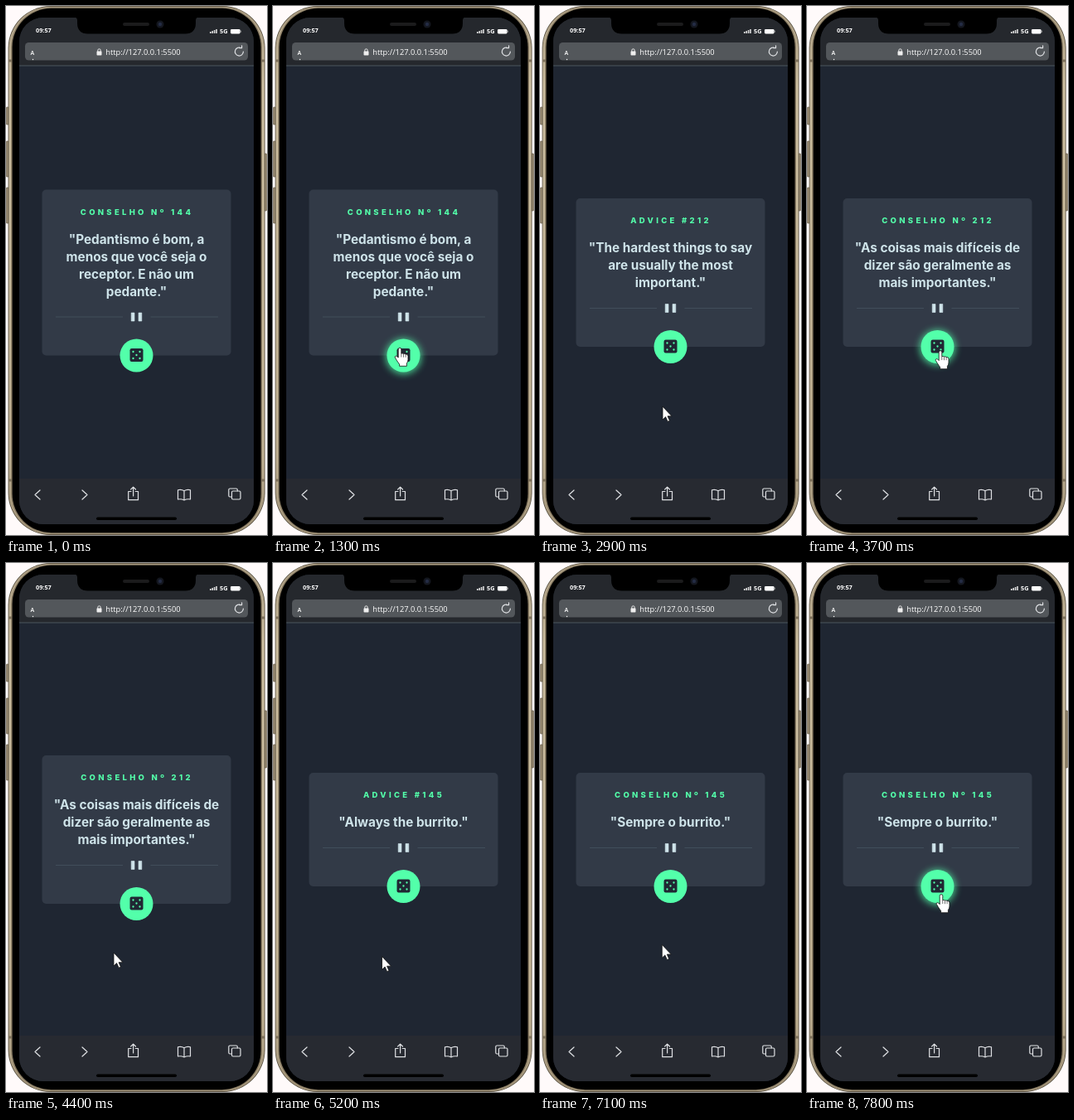
An HTML page that plays this animation: 315 px wide and 638 px high, repeating every 8 s.

```html
<!DOCTYPE html>
<html lang="pt">
<head>
<meta charset="utf-8">
<title>Advice</title>
<style>
html, body { margin: 0; width: 100%; height: 100%; overflow: hidden; background: #fffafa; }
svg { display: block; width: 315px; height: 638px; }
text { font-family: "Open Sans", "Noto Sans", sans-serif; fill: #fff; }
#label, #quote text { font-family: Inter, sans-serif; text-anchor: middle; }
#label { font-size: 9.5px; font-weight: 800; letter-spacing: 3.3px; fill: #53ffaa; }
#quote text { font-size: 15.3px; font-weight: 700; fill: #cee3e9; }
.icon { fill: none; stroke: #dfe1e4; stroke-width: 1.2; stroke-linecap: round; stroke-linejoin: round; }
</style>
</head>
<body>
<svg viewBox="0 0 315 638">
  <defs>
    <linearGradient id="gold" x2="0" y2="1">
      <stop offset="0" stop-color="#a89a80"/>
      <stop offset=".15" stop-color="#cbbd9f"/>
      <stop offset=".85" stop-color="#bfb092"/>
      <stop offset="1" stop-color="#a09278"/>
    </linearGradient>
    <filter id="blur" x="-50%" y="-50%" width="200%" height="200%"><feGaussianBlur stdDeviation="4"/></filter>
    <clipPath id="screen"><rect x="16" y="14" width="283" height="611" rx="29"/></clipPath>
  </defs>

  <!-- phone body -->
  <g fill="#9c8e74" stroke="#5d5443" stroke-width=".6">
    <rect x=".3" y="122" width="5" height="21" rx="1"/>
    <rect x=".3" y="163" width="5" height="43" rx="1"/>
    <rect x=".3" y="219" width="5" height="43" rx="1"/>
    <rect x="309" y="178" width="5.6" height="69" rx="1"/>
  </g>
  <rect x="2.6" width="310" height="638" rx="51" fill="#4d4536"/>
  <rect x="3.4" y=".8" width="308.4" height="636.4" rx="50" fill="url(#gold)"/>
  <rect x="6.2" y="2" width="302.8" height="634" rx="48" fill="#857860"/>
  <path d="M3.4 66h4M308 66h4M3.4 572h4M308 572h4" stroke="#7d705a" stroke-width="3"/>
  <rect x="7.6" y="2.8" width="300" height="632.4" rx="47" fill="#000"/>

  <!-- browser -->
  <g clip-path="url(#screen)">
    <path d="M16 14h283v611h-283z" fill="#1f2632"/>
    <path d="M16 14h283v58h-283z" fill="#25282d"/>
    <path d="M16 72h283" stroke="#4a565c"/>
    <path d="M16 570h283v55h-283z" fill="#272a31"/>
  </g>
  <path d="M82 13.5q4 0 4 4v3q0 13 13 13h117q13 0 13-13v-3q0-4 4-4z"/>
  <rect x="141" y="20" width="32" height="4" rx="2" fill="#1b1b1c"/>
  <circle cx="186" cy="22" r="4.5" fill="#14171f"/>
  <circle cx="186" cy="22" r="2.2" fill="#242c44"/>
  <text x="36" y="32" font-size="7.3" font-weight="700">09:57</text>
  <path d="M246 33v-2h1.6v2zM248.4 33v-3h1.6v3zM250.8 33v-4h1.6v4zM253.2 33v-5h1.6v5z" fill="#ddd"/>
  <text x="258" y="33" font-size="7.4" font-weight="700">5G</text>
  <rect x="271" y="28" width="11.6" height="5.4" rx="1.3" fill="#fff"/>
  <path d="M283.4 29.6v2.2" stroke="#bbb" stroke-width=".8"/>
  <rect x="23" y="44" width="269" height="21.5" rx="4.5" fill="#53575b"/>
  <text x="29.5" y="59" font-size="7" font-weight="600">A</text>
  <circle cx="32.5" cy="64.5" r=".7" fill="#fff"/>
  <rect x="109.5" y="54.6" width="6" height="5" rx=".8" fill="#eee"/>
  <path d="M110.8 55v-1.5a1.7 1.7 0 0 1 3.4 0v1.5" fill="none" stroke="#eee"/>
  <text x="120.3" y="59" font-size="9.3">http://127.0.0.1:5500</text>
  <path class="icon" d="M286.4 55a5 5 0 1 1-2.5-4.3M281.8 50.7h2.8v-2.8"/>
  <g class="icon">
    <path d="M41 584l-6 5.5 6 5.5M92 584l6 5.5-6 5.5"/>
    <path d="M151 585.5h-3.3v10.2h11.8v-10.2h-3.3M153.6 591v-10.8M150.7 583l2.9-2.9 2.9 2.9"/>
    <path d="M215 584.7q-3.5-2.2-7.5-1v11.3q4-.8 7.5 1 3.5-1.8 7.5-1v-11.3q-4-1.2-7.5 1v11.3"/>
    <rect x="272.5" y="585" width="10.5" height="10" rx="1.5"/>
    <path d="M272.3 592h-2a1.5 1.5 0 0 1-1.5-1.5v-7a1.5 1.5 0 0 1 1.5-1.5h7.5a1.5 1.5 0 0 1 1.5 1.5v1.3"/>
  </g>
  <rect x="109" y="616.5" width="97" height="3.4" rx="1.7"/>

  <!-- advice card -->
  <rect id="card" x="43.5" width="228" rx="5" fill="#323a47"/>
  <text id="label" x="158"></text>
  <g id="quote"></g>
  <g id="divider">
    <path d="M60 0h81M174.500 0h81.500" stroke="#414e5b"/>
    <path d="M151.200-5h3.800v10h-3.800zM160-5h3.800v10h-3.800z" fill="#cee3e9" stroke="#cee3e9" stroke-width=".6" stroke-linejoin="round"/>
  </g>
  <g id="button">
    <circle id="glow" cy="1" r="21.500" fill="#53ffaa" opacity=".75" filter="url(#blur)"/>
    <circle r="20" fill="#53ffaa"/>
    <rect x="-8" y="-8.500" width="16" height="16" rx="2.200" fill="#202733"/>
    <path d="M-4-4.500h0M4-4.500h0M0-.5h0M-4 3.500h0M4 3.500h0" stroke="#53ffaa" stroke-width="2.300" stroke-linecap="round"/>
  </g>

  <!-- pointers, tip at 0,0 -->
  <g id="cursor" fill="#fff" stroke="#111" stroke-width=".8" stroke-linejoin="round">
    <path id="arrow" d="M0 0v16l3.600-3.400 2.500 5.600 2.400-1-2.400-5.500h4.900z"/>
    <g id="hand">
      <path d="M-1.800 1.500q0-1.800 1.800-1.800t1.800 1.800v5.300q1.300-1 2.700.2 1.500-.7 2.600.5 2.900-.6 2.900 2.300v4.200q0 2.600-1.600 4.500v3.300h-8.800v-2.300q-1.600-1.900-3.300-4.700l-2-3.300q-.5-1.500.9-1.900 1.300-.3 3 2z"/>
      <path d="M1.800 7v4M4.500 7.200v4M7.100 7.700v3.500" stroke-width=".6"/>
    </g>
  </g>
</svg>
<script>
const LOOP = 8000, STEP = 100, MID = 157.5;

const cards = [
  [0, 'CONSELHO Nº 144', '"Pedantismo é bom, a|menos que você seja o|receptor. E não um|pedante."'],
  [2900, 'ADVICE #212', '"The hardest things to say|are usually the most|important."'],
  [3700, 'CONSELHO Nº 212', '"As coisas mais difíceis de|dizer são geralmente as|mais importantes."'],
  [5200, 'ADVICE #145', '"Always the burrito."'],
  [6100, 'CONSELHO Nº 145', '"Sempre o burrito."']
];

// pointer path: time, x, y
const path = [
  [800, 262, 520], [1300, 153, 412.5], [1900, 153, 412.5], [2400, 148, 483],
  [2900, 148, 483], [3700, 161, 416], [3900, 161, 416], [4400, 130, 470],
  [4900, 130, 470], [5200, 131.5, 474.5], [5500, 136, 502], [6700, 136, 502],
  [7600, 163, 402], [7700, 163, 402], [7800, 162, 400]
];

const $ = id => document.getElementById(id);
const set = (id, name, value) => $(id).setAttribute(name, value);
const move = (id, x, y) => set(id, 'transform', `translate(${x} ${y})`);
const show = (id, on) => set(id, 'visibility', on ? 'visible' : 'hidden');
const ease = p => p * p * (3 - 2 * p);

function pointerAt(t) {
  const i = path.findIndex(k => k[0] > t);
  if (i < 0) return path[path.length - 1].slice(1);
  if (i === 0) return null;
  const [t0, x0, y0] = path[i - 1], [t1, x1, y1] = path[i];
  const p = ease((t - t0) / (t1 - t0));
  return [x0 + (x1 - x0) * p, y0 + (y1 - y0) * p];
}

let shown;
function drawCard(card) {
  const [, label, quote] = card, lines = quote.split('|');
  const height = 116 + 21 * lines.length, top = 321.5 - height / 2, bottom = top + height;
  if (card !== shown) {
    shown = card;
    set('card', 'y', top);
    set('card', 'height', height);
    set('label', 'y', top + 30);
    $('label').textContent = label;
    $('quote').innerHTML = lines
      .map((line, i) => `<text x="${MID}" y="${top + 65.3 + 21 * i}">${line}</text>`).join('');
    move('divider', 0, bottom - 46.5);
    move('button', MID, bottom);
  }
  return bottom;
}

function draw(time) {
  const t = Math.floor(time % LOOP / STEP) * STEP;
  const bottom = drawCard(cards.filter(c => c[0] <= t).pop());
  const tip = pointerAt(t);
  const hover = !!tip && Math.hypot(tip[0] - MID, tip[1] - bottom) < 20;
  if (tip) move('cursor', ...tip);
  show('arrow', tip && !hover);
  show('hand', hover);
  show('glow', hover);
}

const start = performance.now();
function tick() {
  draw(performance.now() - start);
  requestAnimationFrame(tick);
}
tick();
</script>
</body>
</html>
```
